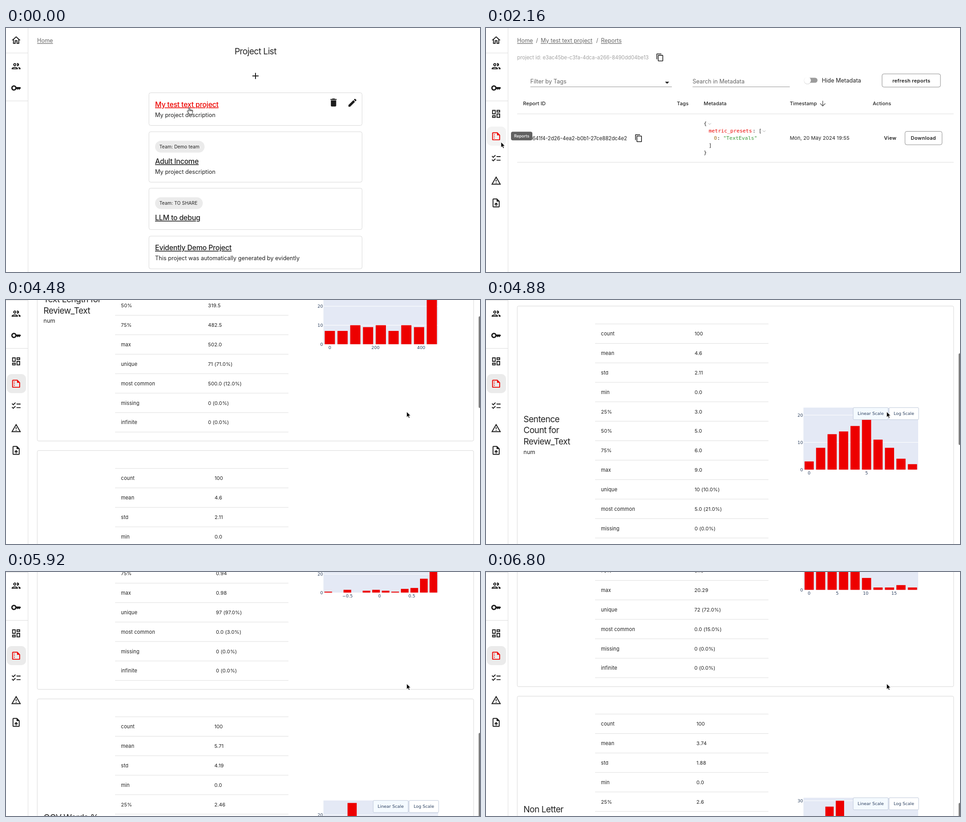
These frames come from a looping animation (1043 px wide and 537 px high, 7.04 s). An HTML page:

```html
<!DOCTYPE html>
<html lang="en">
<head>
<meta charset="utf-8">
<title>Project reports</title>
<style>
  html, body { margin: 0; width: 100%; height: 100%; overflow: hidden; background: #fff; }
  svg { display: block; font-family: Inter, "Open Sans", sans-serif; }
  text { fill: #212121; white-space: pre; }
  .link { fill: #666; text-decoration: underline; text-underline-offset: 2px; }
  .h5 { letter-spacing: -.55px; }
  .h6 { font-weight: 500; letter-spacing: -.25px; text-decoration: underline #999; text-underline-offset: 2px; }
  .red { fill: #ed0400; text-decoration-color: #ed0400; }
  .cell { letter-spacing: .1px; }
  .head { font-weight: 500; letter-spacing: .1px; }
  .btn { font-weight: 600; letter-spacing: .3px; }
  .soft { fill: #666; }
  .pale { fill: #a3a3a3; }
  .tip { fill: #fff; font-weight: 500; }
  .mono { font-family: "DejaVu Sans Mono", monospace; }
  .plot { font-family: "DejaVu Sans", sans-serif; fill: #2a3f5f; }
  .end { text-anchor: end; }
  .mid { text-anchor: middle; }
</style>
</head>
<body>
<svg id="stage" width="1043" height="537" viewBox="0 0 1043 537"></svg>
<script>
const RED = '#ed0400', LINE = '#dedede';
const ICONS = {
  home: 'M12 5.69l5 4.5V18h-2v-6H9v6H7v-7.81l5-4.5M12 3L2 12h3v8h6v-6h2v6h6v-8h3L12 3z',
  people: 'M9 13.75c-2.34 0-7 1.17-7 3.5V19h14v-1.75c0-2.33-4.66-3.5-7-3.5zM4.34 17c.84-.58 2.87-1.25 4.66-1.25s3.82.67 4.66 1.25H4.34zM9 12c1.93 0 3.5-1.57 3.5-3.5S10.93 5 9 5 5.5 6.57 5.5 8.5 7.07 12 9 12zm0-5c.83 0 1.5.67 1.5 1.5S9.83 10 9 10s-1.5-.67-1.5-1.5S8.17 7 9 7zm7.04 6.81c1.16.84 1.96 1.96 1.96 3.44V19h4v-1.75c0-2.02-3.5-3.17-5.96-3.44zM15 12c1.93 0 3.5-1.57 3.5-3.5S16.93 5 15 5c-.54 0-1.04.13-1.5.35.63.89 1 1.98 1 3.15s-.37 2.26-1 3.15c.46.22.96.35 1.5.35z',
  key: 'M21 10h-8.35C11.83 7.67 9.61 6 7 6c-3.31 0-6 2.69-6 6s2.69 6 6 6c2.61 0 4.83-1.67 5.65-4H13l2 2 2-2 2 2 4-4.04L21 10zM7 15c-1.65 0-3-1.35-3-3s1.35-3 3-3 3 1.35 3 3-1.35 3-3 3z',
  board: 'M19 5v2h-4V5h4M9 5v6H5V5h4m10 8v6h-4v-6h4M9 17v2H5v-2h4M21 3h-8v6h8V3zM11 3H3v10h8V3zm10 8h-8v10h8V11zm-10 4H3v6h8v-6z',
  report: 'M15 3H5c-1.1 0-2 .9-2 2v14c0 1.1.9 2 2 2h14c1.1 0 2-.9 2-2V9l-6-6zM5 19V5h9v5h5v9H5zM9 8a1 1 0 1 1-2 0 1 1 0 0 1 2 0zm0 4a1 1 0 1 1-2 0 1 1 0 0 1 2 0zm0 4a1 1 0 1 1-2 0 1 1 0 0 1 2 0z',
  checks: 'M22 7h-9v2h9V7zm0 8h-9v2h9v-2zM5.54 11L2 7.46l1.41-1.41 2.12 2.12 4.24-4.24 1.41 1.41L5.54 11zm0 8L2 15.46l1.41-1.41 2.12 2.12 4.24-4.24 1.41 1.41L5.54 19z',
  warning: 'M12 5.99L19.53 19H4.47L12 5.99M12 2L1 21h22L12 2zm1 14h-2v2h2v-2zm0-6h-2v4h2v-4z',
  upload: 'M14 2H6c-1.1 0-2 .9-2 2v16c0 1.1.9 2 2 2h12c1.1 0 2-.9 2-2V8l-6-6zm4 18H6V4h7v5h5v11zM8 15.01l1.41 1.41L11 14.84V19h2v-4.16l1.59 1.59L16 15.01 12.01 11 8 15.01z',
  bin: 'M6 19c0 1.1.9 2 2 2h8c1.1 0 2-.9 2-2V7H6v12zM19 4h-3.5l-1-1h-5l-1 1H5v2h14V4z',
  edit: 'M3 17.25V21h3.75L17.81 9.94l-3.75-3.75L3 17.25zM20.71 7.04c.39-.39.39-1.02 0-1.41l-2.34-2.34a1 1 0 0 0-1.41 0l-1.83 1.83 3.75 3.75 1.83-1.83z',
  plus: 'M19 13h-6v6h-2v-6H5v-2h6V5h2v6h6v2z',
  copy: 'M16 1H4c-1.1 0-2 .9-2 2v14h2V3h12V1zm3 4H8c-1.1 0-2 .9-2 2v14c0 1.1.9 2 2 2h11c1.1 0 2-.9 2-2V7c0-1.1-.9-2-2-2zm0 16H8V7h11v14z',
  down: 'M20 12l-1.41-1.41L13 16.17V4h-2v12.17l-5.58-5.59L4 12l8 8 8-8z',
  drop: 'M7 10l5 5 5-5z'
};

// Drawing helpers; y of text and icons is the middle of the glyphs.
const text = (x, y, str, size, cls = '', fill = '') =>
  `<text x="${x}" y="${y + size * .36}" font-size="${size}" class="${cls}"${fill && ` style="fill:${fill}"`}>${str}</text>`;
const rect = (x, y, w, h, fill, r = 0, stroke = 'none') =>
  `<rect x="${x}" y="${y}" width="${w}" height="${h}" rx="${r}" fill="${fill}" stroke="${stroke}"/>`;
const rule = (x1, x2, y, color = LINE) => rect(x1, y - .5, x2 - x1, 1, color);
const icon = (name, x, y, size = 23.4, fill = '#1c1c1c') =>
  `<path d="${ICONS[name]}" fill="${fill}" transform="translate(${x - size / 2} ${y - size / 2}) scale(${size / 24})"/>`;
const group = (id, body) => `<g id="${id}">${body}</g>`;

const REPORT = '4db641f4-2d26-4ea2-b0b1-27ce882dc4e2';
const CRUMBS = [[68.5, 'Home'], [120.5, 'My test text project'], [253, 'Reports'], [316.5, REPORT]];
const crumbs = n => CRUMBS.slice(0, n).map(([x, s], i) =>
  text(x, 28, s, 12.45, 'link') + (i ? text(x - 10.5, 28, '/', 12.45, 'soft') : '')).join('');
const projectHead = n => crumbs(n) +
  text(68.5, 64.5, 'project id: e3ac45be-c3fa-4dca-a266-8490dd04be13', 11.25, 'pale') +
  icon('copy', 382.8, 64.8, 18.7);

function card(y, h, title, note, team, chipW) {
  const top = y + (team ? 65 : 25.7);
  return rect(314.5, y, 469, h, '#fff', 4, '#d8d8d8') +
    (team ? rect(328, y + 20, chipW, 26, '#ebebeb', 13) + text(337.5, y + 33, team, 10.15, 'cell') : '') +
    text(328, top, title, 15.65, y < 200 ? 'h6 red' : 'h6') +
    (note ? text(328, top + 23, note, 12.5) : '');
}

const listPage = crumbs(1) + text(549, 51.5, 'Project List', 18.76, 'h5 mid') + icon('plus', 549, 105.5) +
  card(142.5, 72, 'My test text project', 'My project description') +
  card(228.3, 111, 'Adult Income', 'My project description', 'Team: Demo team', 109) +
  card(352.6, 91, 'LLM to debug', '', 'Team: TO SHARE', 105) +
  card(458, 72, 'Evidently Demo Project', 'This project was automatically generated by evidently') +
  icon('bin', 720.7, 164) + icon('edit', 762.3, 164.5);

const chevron = (x, y) => `<path d="M${x - 3} ${y - 1.5}l3 3 3-3" fill="none" stroke="#aaa"/>`;
const json = [[479, 209.5, '{'], [490, 226, 'metric_presets', RED], [586.5, 226, ': ['],
  [501.5, 242, '0', '#a5701c'], [508.5, 242, ':'], [522, 242, '"TextEvals"', '#3c9a3c'],
  [490, 258, ']'], [479, 274, '}']];
const reportsPage = projectHead(3) +
  text(97.5, 117, 'Filter by Tags', 12.5, 'soft') + rule(97.5, 409, 129.5, '#949494') + icon('drop', 398.5, 120, 22) +
  text(454.5, 117, 'Search in Metadata', 12.5, 'soft') + rule(454.5, 668.5, 129.5, '#949494') +
  rect(703, 109.5, 26.5, 11, '#9c9c9c', 5.5) +
  '<circle cx="707.5" cy="116" r="8" fill="#0002"/><circle cx="707.5" cy="115.2" r="7.5" fill="#fff"/>' +
  text(739, 115, 'Hide Metadata', 12.5) +
  rect(871.5, 101, 128.5, 29, '#fff', 4, '#8c8c8c') + text(936, 115.7, 'refresh reports', 10.95, 'btn mid') +
  [[81.5, 'Report ID'], [420, 'Tags'], [479, 'Metadata'], [668.5, 'Timestamp'], [851, 'Actions']]
    .map(([x, s]) => text(x, 166, s, 11, 'head')).join('') +
  icon('down', 741, 166.5, 18.7, '#666') + rule(68.5, 1029, 189) + rule(68.5, 1029, 295.5) +
  text(81, 242.5, REPORT, 11.2) + icon('copy', 336, 242.5, 18.7) +
  json.map(([x, y, s, fill]) => text(x, y, s, 11.3, 'mono', fill)).join('') +
  chevron(492, 211) + chevron(612, 227) +
  text(668.5, 242.5, 'Mon, 20 May 2024 19:55', 11, 'cell') + text(889.5, 242.5, 'View', 10.95, 'btn mid') +
  rect(922, 227.5, 81.5, 29.5, '#fff', 4, '#8c8c8c') + text(962.5, 242.5, 'Download', 10.95, 'btn mid');

const ROWS = 'count,mean,std,min,25%,50%,75%,max,unique,most common,missing,infinite'.split(',');
const PANELS = [
  { title: 'Text Length for|Review_Text', x: 444.5, stats: '311.93,159.05,0.0,186.25,319.5,482.5,502.0,71 (71.0%),500.0 (12.0%)',
    unit: 4.18, bars: [7, 7, 10, 9, 10, 7, 10, 9, 31], yTicks: [0, 10, 20, 30], xTicks: [[0, 712.5], [200, 813], [400, 913.5]] },
  { title: 'Sentence|Count for|Review_Text', x: 459, stats: '4.6,2.11,0.0,3.0,5.0,6.0,9.0,10 (10.0%),5.0 (21.0%)',
    unit: 6, bars: [3, 8, 13, 14, 16, 21, 11, 8, 4, 2], yTicks: [0, 10, 20], xTicks: [[0, 711], [5, 837.5]] },
  { title: 'Sentiment for|Review_Text', x: 462, stats: '0.74,0.36,-0.8,0.72,0.89,0.94,0.98,97 (97.0%),0.0 (3.0%)',
    unit: 2.035, bars: [1, 0, 3, 0, 2, 3, 2, 1, 4, 5, 15, 64], yTicks: [0, 20, 40, 60], xTicks: [['−0.5', 751.5], [0, 822], [0.5, 893]] },
  { title: 'OOV Words %|for Review_Text', x: 458.5, stats: '5.71,4.19,0.0,2.46,5.08,8.16,20.29,72 (72.0%),0.0 (15.0%)',
    unit: 5.24, bars: [19, 15, 25, 17, 14, 5, 1, 1, 2, 1], yTicks: [0, 10, 20], xTicks: [[0, 711], [5, 773], [10, 835.5], [15, 898]] },
  { title: 'Non Letter|Character % for|Review_Text', x: 463, stats: '3.74,1.88,0.0,2.6,3.4,4.5,12.0,70 (70.0%),0.0 (4.0%)',
    unit: 4.33, bars: [4, 18, 27, 30, 12, 4, 2, 1, 1, 0, 1], yTicks: [0, 10, 20, 30], xTicks: [[0, 710], [5, 825]] }
];

function chart({ unit, bars, yTicks, xTicks }, top) {
  const left = 698.5, width = 252.5, zero = top + 360, step = width / bars.length;
  return rect(left, top + 223.5, width, 136.5, '#e4e9f5') +
    yTicks.map(v => (v ? rule(left, left + width, zero - v * unit, '#fff') : '') +
      text(697.5, zero - v * unit, v, 9.4, 'plot end')).join('') +
    bars.map((v, i) => rect(left + step * (i + .1), zero - v * unit, step * .8, v * unit, '#ed0000')).join('') +
    xTicks.map(([s, x]) => text(x, top + 367.7, s, 9.4, 'plot mid')).join('') +
    [[808, 77, '#f4faff', 'Linear Scale'], [887, 65, '#fff', 'Log Scale']].map(([x, w, fill, s]) =>
      rect(x, top + 223.5, w, 26.5, fill, 2, '#bec8d9') + text(x + w / 2, top + 236.3, s, 9.4, 'plot mid')).join('');
}

function panel(p, i) {
  const top = 79.3 + i * 594, rowH = 42.83, lines = p.title.split('|'), shift = (lines.length - 2) * 12.3;
  const stats = ['100', ...p.stats.split(','), '0 (0.0%)', '0 (0.0%)'];
  return rect(68.8, top, 960.2, 573, '#fff', 3, '#d8d8d8') +
    lines.map((s, n) => text(82.5, top + 261 - shift + n * 24.6, s, 18.76, 'h5')).join('') +
    text(82.5, top + 308.5 + shift, 'num', 12.5) + rule(240, 621.5, top + 39.4) +
    ROWS.map((s, n) => {
      const y = top + 61 + n * rowH;
      return text(253, y, s, 11, 'cell') + text(p.x, y, stats[n], 11, 'cell') + rule(240, 621.5, top + 39.4 + (n + 1) * rowH);
    }).join('') + chart(p, top);
}

const stage = document.getElementById('stage');
stage.innerHTML =
  group('list', listPage) + group('dash', projectHead(2)) + group('reports', reportsPage) +
  group('detail', projectHead(4) + PANELS.map(panel).join('')) +
  rect(0, 0, 48, 537, '#fff') + rect(48, 0, 1, 537, LINE) +
  group('side', rule(0, 48, 55) + rule(0, 48, 160.5) +
    icon('home', 22.3, 27) + icon('people', 22.3, 84) + icon('key', 22.3, 132) +
    group('tools', '<rect id="active" x="2" width="42" height="42" rx="10"/>' +
      group('boardIcon', icon('board', 22.3, 189, 23.4, 'inherit')) +
      group('reportIcon', icon('report', 22.3, 238.3, 23.4, 'inherit')) +
      icon('checks', 22.3, 287) + icon('warning', 22.3, 336) + icon('upload', 22.3, 385))) +
  group('tip', rect(55, 228.3, 47, 19, '#616161', 4) + text(78.5, 238, 'Reports', 9, 'tip mid')) +
  '<rect id="bar" x="1040" width="6" height="202" rx="3" fill="#7f7f7f"/>' +
  '<path id="arrow" d="M0 0V12.2L2.8 9.6 4.7 14 6.8 13.1 4.9 8.8H8.7Z" fill="#000" stroke="#fff" stroke-width=".9"/>' +
  '<path id="hand" d="M4 9V2a1.2 1.2 0 0 1 2.5 0V6a1.1 1.1 0 0 1 2.1.3 1.1 1.1 0 0 1 2.1.5 1 1 0 0 1 2 .6V10.500c0 2-1 2.500-1.200 5H5.600C5.300 13.500 2.500 11.500 1 9c-.8-1.400.8-2 1.700-1.200ZM6.500 6V8.500M8.600 6.300V8.700M10.700 6.800V9" fill="#fff" stroke="#000" stroke-width=".9"/>';

const el = id => document.getElementById(id);
const show = (id, on) => el(id).style.display = on ? '' : 'none';
const move = (id, x, y) => el(id).setAttribute('transform', `translate(${x} ${y})`);

// Linear interpolation through [time, value, value...] keys.
function track(keys, t) {
  const n = keys.findIndex(k => k[0] > t);
  if (n === 0) return keys[0].slice(1);
  if (n < 0) return keys[keys.length - 1].slice(1);
  const a = keys[n - 1], b = keys[n], p = (t - a[0]) / (b[0] - a[0]);
  return a.slice(1).map((v, i) => v + (b[i + 1] - v) * p);
}
const SCROLL = [[3920, 0], [4160, 70], [4480, 342], [4720, 600], [4880, 660], [4960, 660], [5280, 1085],
  [5600, 1320], [5920, 1582], [6240, 1960], [6480, 2110], [6800, 2182]];
const POINTER = [[1200, 401, 175], [1440, 270, 190], [1680, 95, 232], [1920, 30, 257], [2080, 33, 251],
  [2480, 33, 251], [2560, 190, 247], [2640, 690, 245], [2720, 881.7, 246]];

function draw(now) {
  const t = Math.floor(now % 7040 / 80) * 80;
  const page = t < 640 ? 'list' : t < 2080 ? 'dash' : t < 3040 ? 'reports' : 'detail';
  for (const id of ['list', 'dash', 'reports', 'detail']) show(id, id === page);

  const [scroll] = track(SCROLL, t);
  move('detail', 0, -scroll);
  move('side', 0, -Math.min(scroll, 54));
  show('bar', scroll > 0);
  el('bar').setAttribute('y', -52 + scroll * .2566);

  const onBoard = page === 'dash';
  show('tools', page !== 'list');
  el('active').setAttribute('y', onBoard ? 168 : 217);
  el('active').setAttribute('fill', t >= 2080 && t < 2240 ? '#f3f3f3' : '#ebebeb');
  el('boardIcon').setAttribute('fill', onBoard ? RED : '#1c1c1c');
  el('reportIcon').setAttribute('fill', onBoard ? '#1c1c1c' : RED);
  show('tip', t >= 1920 && t < 2640);

  const [x, y] = track(POINTER, t);
  const hand = t < 640 || t >= 2720 && t < 3680;
  show('hand', hand);
  show('arrow', !hand);
  move('arrow', x, y);
  move('hand', x - 3, y - .5);
}

const start = performance.now();
(function loop() {
  draw(performance.now() - start);
  requestAnimationFrame(loop);
})();
</script>
</body>
</html>
```
